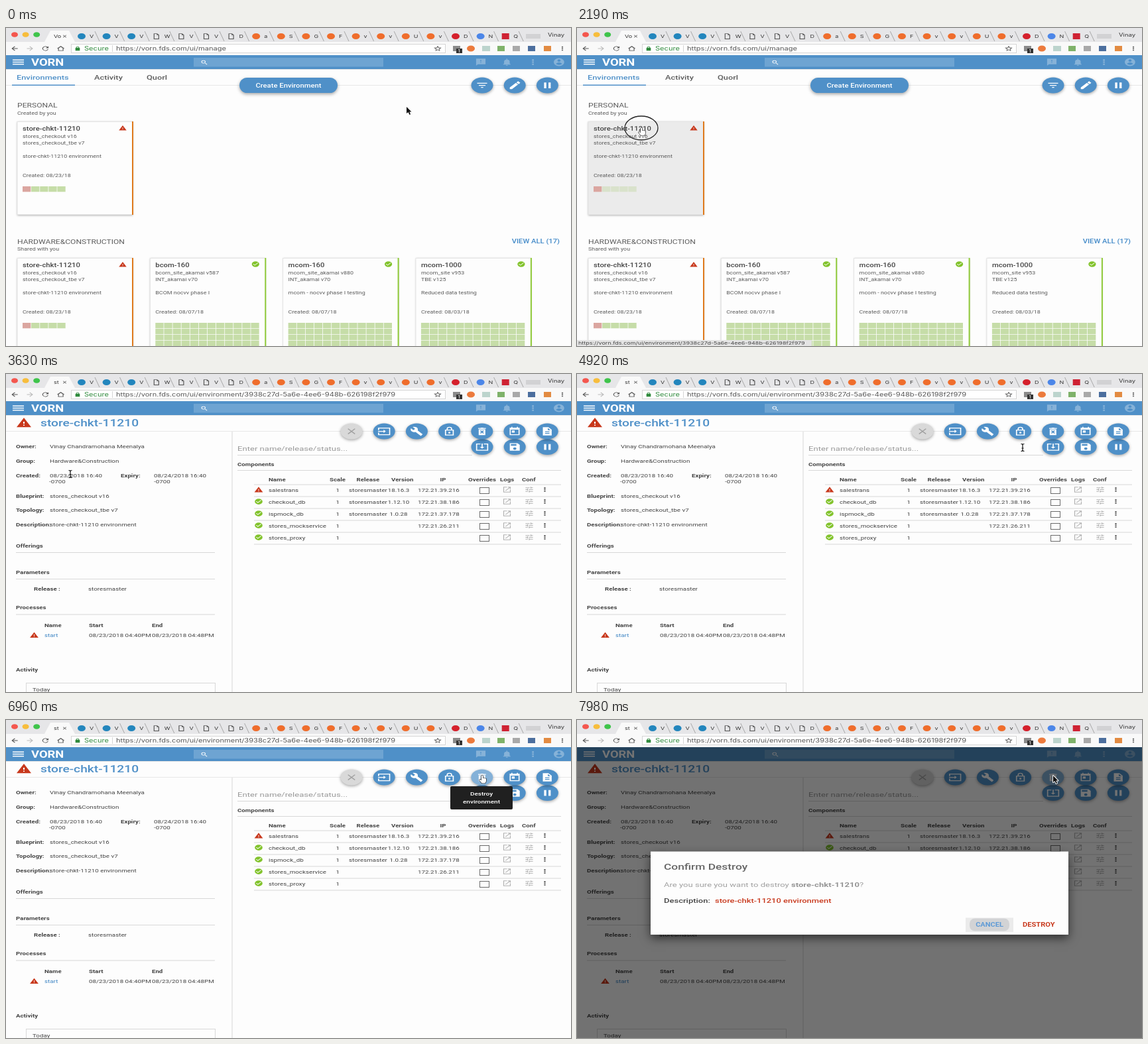
An HTML page with a canvas for the animation above (8 s loop, 852 px wide and 480 px high).

```html
<!DOCTYPE html>
<html lang="en">
<head>
<meta charset="utf-8">
<title>Environment manager</title>
<style>
html, body { margin: 0; width: 100%; height: 100%; overflow: hidden; background: #fdfdfd; }
canvas { display: block; width: 852px; height: 480px; }
</style>
</head>
<body>
<canvas id="stage" width="852" height="480"></canvas>
<script>
const ctx = document.getElementById('stage').getContext('2d');
const SQUASH = 0.75;
const LOOP = 8;
const BLUE = '#4f90c8', DARK = '#444', BODY = '#5c5c5c', RED = '#c8381c', GREEN = '#82c32c';
const PAPER = '#fdfdfd', RULE = '#d8d8d8', FAINT = '#e8e8e8';
const ENV = 'store-chkt-11210';
const HOST = 'https://vorn.fds.com/ui/';
const ENV_URL = HOST + 'environment/3938c27d-5a6e-4ee6-948b-626198f2f979';

// Icons on a 24 unit grid
const ICONS = {
  filter: 'M10 16h4v2h-4zM3 6h18v2H3zM6 11h12v2H6z',
  pen: 'M3 17L14 6l4 4L7 21H3zM15 5l3-3 4 4-3 3z',
  pause: 'M6 5h4v14H6zM14 5h4v14h-4z',
  close: 'M5 6.4L6.4 5 12 10.6 17.6 5 19 6.4 13.4 12 19 17.6 17.6 19 12 13.4 6.4 19 5 17.6 10.6 12z',
  enter: 'M1 9V3h22v18H1v-6h2v4h18V5H3v4zM1 11h10V8l4 4-4 4v-3H1z',
  wrench: 'M22.7 19l-9-9c1-3-.4-6-2-7.5-2-1.6-5-2-7-.8L9 6 6 9 1.6 4.7c-1.2 2.4-.6 5.6 1.3 7.4 2 1.9 4.6 2.4 6.9 1.5l9.7 9.4z',
  lock: 'M4 8h3V6a5 5 0 0 1 10 0v2h3v14H4zM9 8h6V6a3 3 0 0 0-6 0zM6 10v10h12V10zM12 13a2 2 0 1 1 0 4 2 2 0 0 1 0-4z',
  padlock: 'M4 8h3V6a5 5 0 0 1 10 0v2h3v14H4zM9 8h6V6a3 3 0 0 0-6 0z',
  trash: 'M6 7h12v14H6zM5 4h4l1-1h4l1 1h4v2H5zM8.5 11l1.4-1.4 2.1 2.1 2.1-2.1 1.4 1.4-2.1 2.5 2.1 2.5-1.4 1.4-2.1-2.1-2.1 2.1L8.5 16l2.1-2.5z',
  calendar: 'M3 3h3V1h2v2h8V1h2v2h3v18H3zM5 8v11h14V8zM7 10h5v5H7z',
  doc: 'M4 2h10l6 6v14H4zM8 12v2h8v-2zM8 16v2h8v-2zM13 4v5h5z',
  download: 'M9 4v2H3v13h18V6h-6V4h8v17H1V4zM11 4h2v8h3l-4 4-4-4h3z',
  save: 'M3 3h14l4 4v14H3zM5 5v4h10V5zM12 13a3 3 0 1 0 0 6 3 3 0 0 0 0-6z',
  warning: 'M1 21L12 2l11 19zM11 10v4h2v-4zM11 16v2h2v-2z',
  check: 'M12 2a10 10 0 1 0 0 20 10 10 0 0 0 0-20zM5 12l1.4-1.4 3.6 3.6 7.6-7.6L19 8l-9 9z',
  open: 'M3 3h9v2H5v14h14v-7h2v9H3zM14 3h7v7h-2V6.4L9 16.4 7.6 15l10-10H14z',
  tune: 'M3 5h10v2H3zM15 3h2v2h4v2h-4v2h-2zM3 11h4V9h2v6H7v-2H3zM11 11h10v2H11zM3 17h6v2H3zM11 15h2v2h8v2h-8v2h-2z',
  more: 'M10 4h4v4h-4zM10 10h4v4h-4zM10 16h4v4h-4z',
  chat: 'M2 2h20v16H6l-4 4zM11 6v4h2V6zM11 12v2h2v-2z',
  bell: 'M4 18l2-2v-5a6 6 0 0 1 12 0v5l2 2v1H4zM10 20h4v2h-4zM11 2h2v3h-2z',
  person: 'M12 2a10 10 0 1 0 0 20 10 10 0 0 0 0-20zM12 5a3 3 0 1 1 0 6 3 3 0 0 1 0-6zM6 16q6-6 12 0-6 6-12 0z',
  search: 'M9.5 3a6.5 6.5 0 1 0 0 13 6.5 6.5 0 0 0 0-13zM9.5 5a4.5 4.5 0 1 1 0 9 4.5 4.5 0 0 1 0-9zM14 15.5l1.5-1.5 5.5 5.5-1.5 1.5z',
  back: 'M20 11H8l5.5-5.5L12 4l-8 8 8 8 1.5-1.5L8 13h12z',
  forward: 'M4 11h12l-5.5-5.5L12 4l8 8-8 8-1.5-1.5L16 13H4z',
  reload: 'M17.7 6.3A8 8 0 1 0 19.7 14h-2A6 6 0 1 1 16.2 7.8L13 11h7V4z',
  home: 'M2 12L12 3l10 9h-3v8H5v-8zM7 11v7h10v-7l-5-5z',
  star: 'M22 9l-7-.5L12 2 9 8.5 2 9l5.5 5L6 21l6-4 6 4-1.5-7zM12 15l-4 3 1.3-5L6 10.5l4.3-.4L12 6l1.7 4.1 4.3.4-3.3 2.5L16 18z',
  page: 'M5 2h9l5 5v15H5zM7 4v16h10V8h-4V4z'
};
for (const name in ICONS) ICONS[name] = new Path2D(ICONS[name]);

const clamp = v => Math.max(0, Math.min(1, v));
const smooth = v => (v = clamp(v), v * v * (3 - 2 * v));

function rect(x, y, w, h, color) {
  ctx.fillStyle = color;
  ctx.fillRect(x, y, w, h);
}
function frame(x, y, w, h, color) {
  ctx.strokeStyle = color;
  ctx.lineWidth = 1;
  ctx.strokeRect(x + 0.5, y + 0.5, w, h);
}
function ellipse(x, y, rx, ry, color) {
  ctx.fillStyle = color;
  ctx.beginPath();
  ctx.ellipse(x, y, rx, ry, 0, 0, 7);
  ctx.fill();
}
const dot = (x, y, r, color) => ellipse(x, y, r, r * SQUASH, color);

function rounded(x, y, w, h, r, color) {
  ctx.fillStyle = color;
  ctx.beginPath();
  ctx.roundRect(x, y, w, h, r);
  ctx.fill();
}

// y is the middle of the capital letters
function text(str, x, y, size, color = DARK, weight = 400, align = 'left', family = 'Roboto') {
  ctx.save();
  ctx.translate(x, y + size * 0.267);
  ctx.scale(1, SQUASH);
  ctx.font = `${weight} ${size}px ${family}, sans-serif`;
  ctx.textAlign = align;
  ctx.fillStyle = color;
  ctx.fillText(str, 0, 0);
  const width = ctx.measureText(str).width;
  ctx.restore();
  return x + width;
}
const ui = (str, x, y, size, color) => text(str, x, y, size, color, 400, 'left', 'Inter');

function icon(name, x, y, size, color) {
  ctx.save();
  ctx.translate(x, y);
  ctx.scale(size / 24, size / 24 * SQUASH);
  ctx.translate(-12, -12);
  ctx.fillStyle = color;
  ctx.fill(ICONS[name], 'evenodd');
  ctx.restore();
}
function shadowed(color, blur, dy, draw) {
  ctx.save();
  ctx.shadowColor = color;
  ctx.shadowBlur = blur;
  ctx.shadowOffsetY = dy;
  draw();
  ctx.restore();
}
function roundButton(name, x, y, color = BLUE, ink = '#fff') {
  shadowed('rgba(0,0,0,.35)', 4, 1.5, () => ellipse(x, y, 16.5, 12, color));
  icon(name, x, y, 20, ink);
}

function browser(onDetail) {
  rect(0, 0, 852, 41, '#f9f9f9');
  rect(0, 0, 852, 21, '#e6e6e8');
  ['#f4564e', '#f7bd3c', '#3fc44b'].forEach((c, i) => dot(13 + i * 16.6, 10, 5, c));
  ctx.fillStyle = '#f9f9f9';
  ctx.beginPath();
  ctx.moveTo(58, 21); ctx.lineTo(67, 4); ctx.lineTo(95, 4); ctx.lineTo(104, 21);
  ctx.fill();
  ui(onDetail ? 'st' : 'Vo', 72, 12.5, 9, '#333');
  icon('close', 88.5, 12.5, 9, '#555');

  const favicons = 'cccppppoooooooorbs', titles = 'VVVWVVDaSGFvvUvDNQ';
  const colors = { c: '#2386bd', o: '#ef6d2c', r: '#d5202c', b: '#4c86e8' };
  [...favicons].forEach((kind, i) => {
    const x = 114 + i * 37.6;
    if (kind === 'p') icon('page', x, 12.5, 14, '#555');
    else if (kind === 's') rect(x - 5.5, 8, 11, 9, '#cf2233');
    else dot(x, 12.5, 6, colors[kind]);
    ui(titles[i], x + 12, 12.5, 9, '#333');
    ctx.strokeStyle = '#a8a8a8';
    ctx.lineWidth = 1;
    ctx.beginPath();
    ctx.moveTo(x + 20, 5); ctx.lineTo(x + 27, 20);
    ctx.stroke();
  });
  rect(784, 9, 22, 7, '#d2d2d4');
  ui('Vinay', 817, 10.5, 9.6, '#333');

  ['back', 'forward', 'reload', 'home'].forEach((n, i) => icon(n, 13 + i * 23.2, 31, 14, i === 1 ? '#bbb' : '#555'));
  rect(98, 24, 564, 14, '#fff');
  frame(98, 24, 564, 13, '#d5d5d5');
  icon('padlock', 108, 31, 10, '#2f8a3c');
  ui('Secure', 118, 31, 11.1, '#2f8a3c');
  rect(160, 26, 1, 10, '#d5d5d5');
  ui(onDetail ? ENV_URL : HOST + 'manage', 166, 31, 11.1, '#555');
  icon('star', 651, 31, 14, '#555');
  rect(674, 27, 11, 8, '#8a8a8a');
  rect(679, 31, 9, 7, '#333');
  ui('1', 681.5, 34.5, 8, '#fff');
  dot(701, 31, 6, '#ec7a3c');
  rect(718, 27, 12, 8, '#bcd4cd');
  rect(741, 27, 11, 8, '#7fb26a');
  rect(764, 27, 11, 8, '#a9a9a9');
  rect(787, 27, 11, 8, '#4c6f9e');
  rect(811, 27, 11, 8, '#e28b42');
  icon('more', 839, 31, 13, '#666');
}

function appHeader() {
  rect(0, 41, 852, 21, BLUE);
  for (let i = 0; i < 3; i++) rect(10, 47.5 + i * 3.2, 17, 1.5, '#fff');
  text('VORN', 38, 52, 18.4, '#fff', 700);
  rect(283, 45, 286, 13.5, '#6ea4d2');
  icon('search', 299, 52, 12, '#fff');
  ['chat', 'bell', 'more', 'person'].forEach((n, i) => icon(n, 716 + i * 39.3, 51.5, i === 3 ? 19 : 17, '#86b2d8'));
  rect(0, 62, 852, 1, '#e4e4e4');
}

function card(x, y, { title, lines, about, created, failing }, hovered) {
  shadowed('rgba(0,0,0,.3)', 3, 1, () => rect(x, y, 174, 141, hovered ? '#ebebeb' : PAPER));
  frame(x - 0.5, y, 174, 140, '#e4e4e4');
  rect(x + 173, y, 2, 141, failing ? '#df7a1c' : '#8fca38');
  text(title, x + 8, y + 10.5, 11.25, DARK, 500);
  if (failing) icon('warning', x + 159, y + 10, 12.5, RED);
  else icon('check', x + 159, y + 9.5, 13.5, GREEN);
  lines.forEach((line, i) => text(line, x + 8, y + 22.5 + i * 10, 8.93, BODY));
  text(about, x + 8, y + 52.5, 8.93, BODY);
  text('Created: ' + created, x + 8, y + 81.5, 8.93, BODY);
  const columns = failing ? 5 : 12, rows = failing ? 1 : 4;
  for (let r = 0; r < rows; r++)
    for (let c = 0; c < columns; c++)
      rect(x + 8 + c * 13.1, y + 98 + r * 9, 12.3, 8.3,
        failing && !c ? '#dba6a0' : hovered ? '#d9e2cb' : '#c6dda8');
}

const failed = { title: ENV, lines: ['stores_checkout v16', 'stores_checkout_tbe v7'],
  about: ENV + ' environment', created: '08/23/18', failing: true };
const sharedCards = [
  failed,
  { title: 'bcom-160', lines: ['bcorn_site_akamai v587', 'INT_akamai v70'], about: 'BCOM nocvv phase I', created: '08/07/18' },
  { title: 'mcom-160', lines: ['mcom_site_akamai v880', 'INT_akamai v70'], about: 'mcom - nocvv phase I testing', created: '08/07/18' },
  { title: 'mcom-1000', lines: ['mcom_site v953', 'TBE v125'], about: 'Reduced data testing', created: '08/03/18' }
];

function overview(hovered) {
  rect(0, 86, 852, 1, FAINT);
  text('Environments', 16, 75, 12.8, BLUE, 500);
  text('Activity', 133, 75, 12.8, BODY, 500);
  text('Quorl', 212, 75, 12.8, BODY, 500);
  rect(9, 85.5, 95, 1.5, BLUE);
  shadowed('rgba(0,0,0,.35)', 5, 2, () => rounded(352, 75, 148, 23, 12, BLUE));
  text('Create Environment', 426, 86.5, 11.25, '#fff', 500, 'center');
  ['filter', 'pen', 'pause'].forEach((n, i) => roundButton(n, 718 + i * 49.2, 86.5));

  text('PERSONAL', 17, 116.5, 12.1, BODY);
  text('Created by you', 17, 128.5, 8.93, BODY);
  card(17, 141, failed, hovered);
  text('HARDWARE&CONSTRUCTION', 17, 322.5, 12.1, BODY);
  text('Shared with you', 17, 334, 8.93, BODY);
  text('VIEW ALL (17)', 835, 322.5, 11.2, '#4189c8', 500, 'right');
  sharedCards.forEach((c, i) => card(17 + i * 200.3, 347, c));
  if (hovered) {
    rect(0, 471, 354, 9, '#e4e4e4');
    ui(ENV_URL, 2, 475.5, 9, '#444');
  }
}

function detail(buttonHovered) {
  const bold = (s, x, y) => text(s, x, y, 9.7, DARK, 700);
  const plain = (s, x, y, color = DARK, align = 'left') => text(s, x, y, 9.8, color, 400, align);

  rect(0, 86, 852, 1, FAINT);
  icon('warning', 27, 73.5, 24, RED);
  text(ENV, 52, 74, 19.2, BLUE, 500);
  rect(340.5, 87, 1, 393, RULE);

  [['Owner:', 'Vinay Chandramohana Meenalya', 109.5], ['Group:', 'Hardware&Construction', 131],
   ['Created:', '08/23/2018 16:40', 153], ['Blueprint:', 'stores_checkout v16', 184],
   ['Topology:', 'stores_checkout_tbe v7', 205.5], ['Description:', ENV + ' environment', 227]]
    .forEach(([label, value, y]) => { bold(label, 15, y); plain(value, 66, y); });
  bold('Expiry:', 173, 153);
  plain('08/24/2018 16:40', 223, 153);
  plain('-0700', 65, 162.5);
  plain('-0700', 223, 162.5);

  [['Offerings', 259], ['Parameters', 299], ['Processes', 352.5]].forEach(([label, y]) => {
    bold(label, 15, y);
    rect(15, y + 10, 300, 1, RULE);
  });
  bold('Release :', 42, 324.5);
  plain('storesmaster', 124, 324.5);
  bold('Name', 58, 379.5);
  bold('Start', 125, 379.5);
  bold('End', 220, 379.5);
  icon('warning', 42.5, 394, 14, RED);
  plain('start', 58, 394.5, '#3f86c4');
  plain('08/23/2018 04:40PM', 125, 394.5);
  plain('08/23/2018 04:48PM', 220, 394.5);
  bold('Activity', 15, 446.5);
  frame(30, 466, 285, 30, RULE);
  plain('Today', 40, 476);

  text('Enter name/release/status...', 349, 113, 13.1, '#999');
  rect(349, 122, 354, 1, RULE);
  bold('Components', 349, 136.5);
  rect(349, 145, 488, 1, RULE);
  [['Name', 396], ['Scale', 488], ['Release', 528.5], ['Version', 581], ['IP', 654.5],
   ['Overrides', 697], ['Logs', 745], ['Conf', 778]].forEach(([label, x]) => bold(label, x, 159));
  [['salestrans', '18.16.3', '172.21.39.216'], ['checkout_db', '1.12.10', '172.21.38.186'],
   ['ispmock_db', '1.0.28', '172.21.37.178'], ['stores_mockservice', '', '172.21.26.211'], ['stores_proxy', '', '']]
    .forEach(([name, version, ip], i) => {
      const y = 175.5 + i * 18;
      rect(374, y - 9, 463, 1, RULE);
      icon(i ? 'check' : 'warning', 381, y - 1, 14, i ? GREEN : RED);
      plain(name, 396, y);
      plain('1', 497.5, y);
      if (version) plain('storesmaster', 517, y);
      plain(version, 592, y, DARK, 'center');
      plain(ip, 621, y);
      frame(714, y - 4.5, 14, 9, '#6a6a6a');
      icon('open', 755.5, y - 1, 15, '#b3b3b3');
      icon('tune', 789, y - 1, 15, '#b3b3b3');
      icon('more', 812.5, y - 1, 13, '#444');
    });
  rect(374, 256.5, 463, 1, RULE);

  ['download', 'save', 'pause'].forEach((n, i) => roundButton(n, 718 + i * 49.2, 110));
  ['close', 'enter', 'wrench', 'lock', 'trash', 'calendar', 'doc'].forEach((n, i) => {
    const color = i === 0 ? '#d9d9d9' : n === 'trash' && buttonHovered ? '#84b1d8' : BLUE;
    roundButton(n, 521 + i * 49.2, 86.5, color, i === 0 ? '#a0a0a0' : '#fff');
  });
}

function tooltip(alpha) {
  ctx.globalAlpha = alpha;
  rounded(670, 100, 94, 35, 2, '#202020');
  text('Destroy', 717, 111, 10, '#fff', 500, 'center');
  text('environment', 717, 123.5, 10, '#fff', 500, 'center');
  ctx.globalAlpha = 1;
}

function dialog(age) {
  const shown = 1 - (1 - clamp(age / 0.35)) ** 3;
  rect(0, 41, 852, 439, `rgba(0,0,0,${0.55 * shown})`);

  ctx.save();
  ctx.globalAlpha = clamp(age / 0.12);
  ctx.translate(0, -45 * (1 - shown));
  shadowed('rgba(0,0,0,.6)', 14, 5, () => rect(111, 198.5, 630, 125.5, PAPER));
  text('Confirm Destroy', 131, 221.5, 17.4, '#666', 500);
  const end = text('Are you sure you want to destroy ', 131, 248.8, 13.05, '#a0a0a0');
  text('?', text(ENV, end, 248.8, 13.05, '#949494', 700), 248.8, 13.05, '#a0a0a0');
  text('Description:', 131, 273, 13, DARK, 500);
  text(ENV + ' environment', 208, 273, 12.95, '#c8381c', 500);

  rect(586, 298.5, 72, 21.5, '#ebebeb');
  const ripple = 21 + 9 * smooth((age - 0.19) / 0.4);
  rounded(622 - ripple, 299.5, ripple * 2, 19, 8, '#d2d3d5');
  text('CANCEL', 622, 309.5, 11, '#5d9ad6', 700, 'center');
  text('DESTROY', 672, 309.5, 11.1, '#c8381c', 700);
  ctx.restore();
}

const POINTERS = {
  arrow: new Path2D('M0 0v10l2.5-2 2 4 1.6-.7-1.8-3.8h3.2z'),
  hand: new Path2D('M-1 0q1-1.5 2 0v3.5l5 1v4l-1.5 3h-5L-4 7q0-1.5 1.5-1l1.5 1z'),
  beam: new Path2D('M-2.5-5.5q2.5 0 2.5 1.5 0-1.5 2.5-1.5M0-4v8M-2.5 5.5q2.5 0 2.5-1.5 0 1.5 2.5 1.5M-1.5 1h3')
};
function pointer(kind, x, y) {
  ctx.save();
  ctx.translate(x, y);
  ctx.lineJoin = 'round';
  ctx.lineWidth = kind === 'arrow' ? 1.8 : 1.2;
  ctx.strokeStyle = kind === 'arrow' ? '#fff' : '#111';
  ctx.stroke(POINTERS[kind]);
  if (kind !== 'beam') {
    ctx.fillStyle = kind === 'arrow' ? '#111' : '#fff';
    ctx.fill(POINTERS[kind]);
  }
  ctx.restore();
}

// Pointer route: time, x, y
const ROUTE = [[0.3, 604, 119], [1.5, 97, 151], [3.85, 97, 151], [4.85, 672, 111], [5.05, 672, 111], [5.5, 718, 84]];
function pointerAt(t) {
  const next = ROUTE.findIndex(p => p[0] > t);
  if (next < 1) return ROUTE.at(next).slice(1);
  const [t0, x0, y0] = ROUTE[next - 1], [t1, x1, y1] = ROUTE[next];
  const k = smooth((t - t0) / (t1 - t0));
  return [x0 + (x1 - x0) * k, y0 + (y1 - y0) * k];
}

const OPENED = 2.55, CONFIRM = 7.34;
function draw(t) {
  const [x, y] = pointerAt(t);
  const onDetail = t >= OPENED, confirming = t >= CONFIRM;
  const onCard = !onDetail && x < 191 && y > 141;
  const onButton = onDetail && x > 705 && y < 98;
  const onText = onDetail && (x < 145 || (x > 349 && x < 702 && y > 104 && y < 122));

  rect(0, 0, 852, 480, PAPER);
  onDetail ? detail(onButton) : overview(onCard);
  appHeader();
  browser(onDetail);
  if (onDetail && t > 5.8 && !confirming) tooltip(smooth((t - 5.8) / 0.15));
  if (confirming) dialog(t - CONFIRM);

  if (t > 2 && t < 2.4) {
    const grow = 0.4 + 0.6 * smooth((t - 2) / 0.12);
    ctx.strokeStyle = '#222';
    ctx.lineWidth = 1.3;
    ctx.beginPath();
    ctx.ellipse(97, 151, 25 * grow, 18 * grow, 0, 0, 7);
    ctx.stroke();
  }
  pointer(confirming ? 'arrow' : onCard || onButton ? 'hand' : onText ? 'beam' : 'arrow', x, y);
}

const start = performance.now();
function tick() {
  draw((performance.now() - start) / 1000 % LOOP);
  requestAnimationFrame(tick);
}
tick();
</script>
</body>
</html>
```
